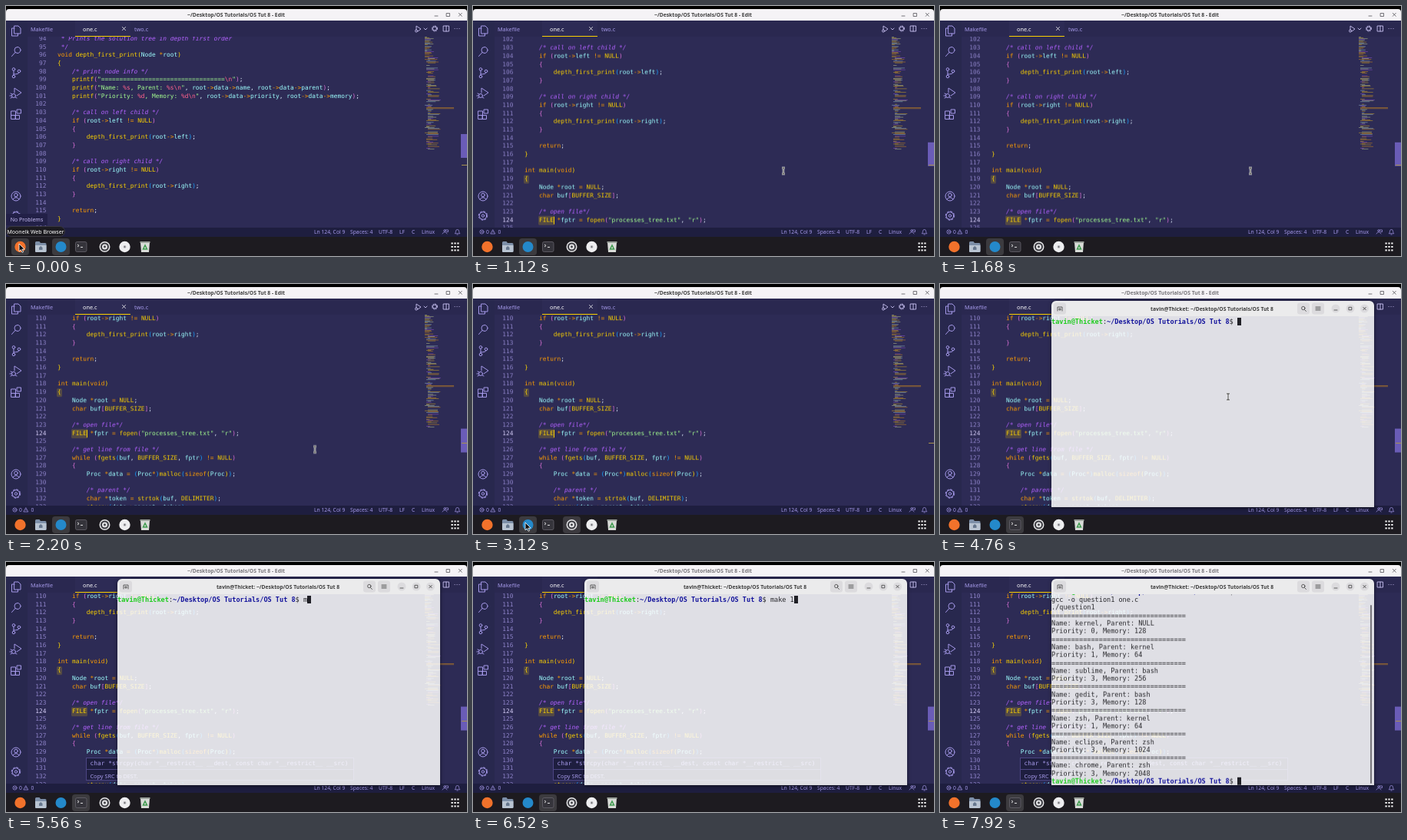
Write an HTML page that moves like this. It is 600x326 px and loops after 8000 ms.

```html
<!DOCTYPE html>
<html lang="en">
<head>
<meta charset="utf-8">
<title>Editor and terminal</title>
<style>
:root { --mono: "DejaVu Sans Mono", monospace; --sans: "Noto Sans", sans-serif; --row: 10.6875px; }
html, body { margin: 0; width: 100%; height: 100%; overflow: hidden; background: #000; }
#stage { position: relative; width: 600px; height: 326px; overflow: hidden; background: #2d2b55; }
#stage > * { position: absolute; }
.loop { animation: 8s linear infinite; }
.step { animation-timing-function: step-end; }

#editor { left: 28px; top: 40px; width: 515px; height: 249px; overflow: hidden; }
#listing { position: absolute; left: 0; top: 0; --notch: -28.125px; animation-name: scroll; }
#thumb { left: 592px; top: 167px; width: 8px; height: 31px; background: #7565c8; opacity: .85;
  --notch: 3.6px; animation-name: scroll, thumb; }
#listing div { position: absolute; white-space: pre; font: 7.875px/var(--row) var(--mono); color: #e1efff; }
#listing .no { left: 0; width: 24.5px; text-align: right; color: #8d82c8; }
#listing .mark { background: #fad00030; box-shadow: 0 0 0 .5px #fad00060; height: 9.6px; }
#listing .caret { width: 1px; height: 9.6px; background: #fad000; animation-name: caret; }
.comment { color: #b362ff; font-style: italic; }
.str { color: #a5ff90; }
.esc { color: #ff628c; }
.key, .op { color: #ff9d00; }
.fn, .macro { color: #fad000; }
.id { color: #9effff; }
.b0 { color: #ffd700; } .b1 { color: #da70d6; } .b2 { color: #179fff; }

#chrome { left: 0; top: 0; }
text { font: 6.75px var(--sans); fill: #a599e9; white-space: pre; }
.tab { font-size: 7.3px; }
.title { font-weight: bold; fill: #3d3d3d; text-anchor: middle; animation-name: blur; }
.line { fill: none; stroke: #a599e9; stroke-width: 1; stroke-linejoin: round; stroke-linecap: round; }
.lit { fill: #fff; fill-opacity: .14; }

.tip { box-sizing: border-box; font: 7px/13px var(--sans); color: #fff; white-space: pre; text-align: center; }
.dock { height: 14px; top: 287px; border-radius: 7px; background: #1c1b20; border: .5px solid #39373f; }
#hover { left: 104px; top: 255px; width: 349px; height: 30px; background: #1e1e3f; border: .5px solid #4d4684;
  color: #a599e9; box-sizing: border-box; overflow: hidden; animation-name: hover; }
#hover div { padding-left: 4.5px; white-space: pre; font: 7.875px/14px var(--mono); }
#hover div + div { font: 7.3px/16px var(--sans); border-top: .5px solid #4d4684; }

#term { left: 145px; top: 22px; width: 420px; height: 269px; border-radius: 6px 6px 0 0; overflow: hidden;
  box-shadow: 0 1px 5px #0008; animation-name: open; }
#bar { position: absolute; inset: 0 0 auto; height: 20px; background: #ebebec; }
#screen { position: absolute; inset: 20px 0 0; background: #ffffffd9; overflow: hidden; }
#rows { position: absolute; left: 0; top: 1.9px; font: 8.55px/10.3px var(--mono); color: #28282c;
  animation-name: feed; }
#rows div { height: 10.3px; white-space: pre; }
#rows b { color: #1fcc1f; } #rows b + b { color: #14149c; }
#rows i { display: inline-block; vertical-align: top; width: 1ch; height: 10.3px; background: #202026; }
#typed { display: inline-block; vertical-align: top; height: 10.3px; overflow: hidden; animation-name: type; }
#ask i { animation-name: before; }
#built { animation-name: built; }
#wait { animation-name: wait; }
#result { animation-name: after; }
#result i { animation-name: blink; }
#slide { position: absolute; right: 3px; top: 14px; width: 2px; height: 233px; border-radius: 1px;
  background: #77757c; animation-name: after; }

#mouse { left: 0; top: 0; animation-name: mouse; }
#arrow { animation-name: arrow; } #beam { animation-name: beam; }

@keyframes scroll {
  0% { transform: none; }
  11% { transform: translateY(var(--notch)); }
  12.5% { transform: translateY(calc(var(--notch) * 2)); }
  14% { transform: translateY(calc(var(--notch) * 3)); }
  23% { transform: translateY(calc(var(--notch) * 4)); }
  25% { transform: translateY(calc(var(--notch) * 5)); }
  26.5%, 100% { transform: translateY(calc(var(--notch) * 6)); }
}
@keyframes thumb { 0%, 36% { opacity: .85; } 38%, 56.5% { opacity: 0; } 57%, 100% { opacity: .85; } }
@keyframes caret {
  0% { opacity: 1; } 3.125% { opacity: 0; } 9.375% { opacity: 1; } 15.625% { opacity: 0; }
  21.875% { opacity: 1; } 28.125% { opacity: 0; } 34.375% { opacity: 1; } 40.625% { opacity: 0; }
  46.875% { opacity: 1; } 53.125%, 100% { opacity: 0; }
}
@keyframes blur { 0%, 57% { fill: #3d3d3d; } 58%, 100% { fill: #77757a; } }
@keyframes app { 0%, 2% { opacity: 1; } 4%, 100% { opacity: 0; } }
@keyframes problems { 0%, 5% { opacity: 1; } 6%, 100% { opacity: 0; } }
@keyframes terminal { 0%, 45% { opacity: 0; } 46.5%, 55% { opacity: 1; } 56.5%, 100% { opacity: 0; } }
@keyframes hover { 0% { opacity: 0; } 68.5%, 100% { opacity: 1; } }
@keyframes litApp { 0%, 2% { opacity: 1; } 3%, 100% { opacity: 0; } }
@keyframes litEditor { 0%, 57% { opacity: 1; } 58%, 100% { opacity: 0; } }
@keyframes litTerm { 0%, 42% { opacity: 0; } 43%, 100% { opacity: 1; } }
@keyframes litGear { 0%, 34% { opacity: 0; } 35.5%, 39% { opacity: 1; } 40.5%, 100% { opacity: 0; } }
@keyframes open {
  0%, 56.5% { opacity: 0; transform: scale(.9); }
  59%, 100% { opacity: 1; transform: none; }
}
@keyframes type {
  0% { width: 0; } 68.5% { width: 1ch; } 70% { width: 2ch; } 71.5% { width: 3ch; }
  73% { width: 4ch; } 76% { width: 5ch; } 78%, 100% { width: 6ch; }
}
@keyframes before { 0% { opacity: 1; } 85%, 100% { opacity: 0; } }
@keyframes built { 0% { opacity: 0; } 85%, 100% { opacity: 1; } }
@keyframes wait { 0% { opacity: 0; } 85% { opacity: 1; } 88%, 100% { opacity: 0; } }
@keyframes after { 0% { opacity: 0; } 88%, 100% { opacity: 1; } }
@keyframes feed { 0% { transform: none; } 88%, 100% { transform: translateY(-10.3px); } }
@keyframes blink { 0% { opacity: 1; } 91.5% { opacity: 0; } 99%, 100% { opacity: 1; } }
@keyframes mouse {
  0% { transform: translate(17px, 310px); animation-timing-function: ease-in-out; }
  8.5%, 27% { transform: translate(404px, 215px); animation-timing-function: ease-in-out; }
  35.5%, 36.5% { transform: translate(126px, 311px); animation-timing-function: ease-in-out; }
  39%, 40% { transform: translate(68px, 311px); animation-timing-function: ease-in-out; }
  43%, 50% { transform: translate(96px, 311px); animation-timing-function: ease-in-out; }
  54.5%, 55.5% { transform: translate(347px, 157px); }
  59%, 61.5% { transform: translate(375px, 147px); animation-timing-function: ease-in-out; }
  66.5%, 100% { transform: translate(120px, 290px); }
}
@keyframes arrow { 0% { opacity: 1; } 3% { opacity: 0; } 33% { opacity: 1; } 51.5%, 100% { opacity: 0; } }
@keyframes beam { 0% { opacity: 0; } 3% { opacity: 1; } 33% { opacity: 0; } 51.5% { opacity: 1; } 68.5%, 100% { opacity: 0; } }
</style>
</head>
<body>
<div id="stage">
  <div id="editor"><div id="listing" class="loop step"></div></div>
  <div id="thumb" class="loop step"></div>
  <svg id="chrome" width="600" height="326">
    <path d="M0 0h600v19H0z" fill="#000"/>
    <path d="M0 19V8q0-4 4-4h592q4 0 4 4v11z" fill="#f5f3f6"/>
    <text class="title loop" x="299.5" y="13.6">~/Desktop/OS Tutorials/OS Tut 8 - Edit</text>
    <g class="line" style="stroke:#55535a;stroke-width:.8">
      <path d="M558 13h4M573.5 9.5h4v4h-4zM589.3 9.3l4 4m0-4l-4 4"/>
    </g>
    <path d="M0 19h28v270H0z" fill="#28284e"/>
    <path d="M28 19h572v21H28z" fill="#2a2850"/>
    <path d="M90 19h72v21H90z" fill="#2d2b55"/>
    <path d="M90 39.5h72" stroke="#fad000"/>
    <text class="tab" x="32" y="32.6">Makefile</text>
    <text class="tab" x="100" y="32.6" style="fill:#fff">one.c</text>
    <text class="tab" x="167" y="32.6">two.c</text>
    <path class="line" d="M151.5 27.5l4 4m0-4l-4 4" style="stroke:#fff;stroke-width:.8"/>
    <g class="line">
      <path d="M11 26h5l3 3v7h-8zM11 29H7.5v10h8v-3"/>
      <circle cx="15" cy="57.5" r="4"/><path d="M12 60.5l-4.5 5"/>
      <circle cx="10" cy="82.5" r="1.8"/><circle cx="17" cy="85" r="1.8"/><circle cx="10" cy="92" r="1.8"/>
      <path d="M10 84.5v5.5M17 87q0 2-7 2"/>
      <path d="M11 113v-6l9 6-6 4"/><circle cx="10" cy="117" r="2.5"/><path d="M6 114l2 1m-3 2h2m-1 3l2-1m4 0l2 1"/>
      <path d="M7 137h5.5v5.5H7zM7 142.5h5.5v5H7zM12.5 142.5h5v5h-5zM14.5 135h5v5h-5z"/>
      <circle cx="13" cy="248" r="6"/><circle cx="13" cy="246.5" r="2.3"/><path d="M9 252q4-5 8 0"/>
      <circle cx="13" cy="273.5" r="4.8"/><circle cx="13" cy="273.5" r="1.7"/>
      <circle cx="13" cy="273.5" r="5.7" stroke-dasharray="2 2.48"/>
    </g>
    <g class="line" style="stroke:#c9c1f2;stroke-width:.9">
      <path d="M534 31v-5l6 4-4 3M544 29l2 2 2-2"/><circle cx="534" cy="32.5" r="1.5"/>
      <circle cx="558" cy="29.5" r="2.5"/><circle cx="558" cy="29.5" r="3.5" stroke-dasharray="1.2 1.55"/>
      <path d="M569.5 26h7v7h-7zM573 26v7M584 29.5h.1m2.9 0h.1m2.9 0h.1"/>
    </g>
    <g id="minimap"></g>
    <path d="M593 207.5h7" stroke="#a8924a"/>
    <path d="M0 289h600v12H0z" fill="#1e1e3f"/>
    <g class="line" style="stroke-width:.7">
      <circle cx="11.5" cy="294.5" r="2.6"/><path d="M10.5 293.5l2 2m0-2l-2 2M26 292l2.8 5h-5.6zM26 294v1"/>
      <path d="M568 297q3-5 6 0M572.5 292h3v2.5h-2M584.5 296.5q1-1 1-3a2 2 0 0 1 4 0q0 2 1 3zM587 298h1"/>
      <circle cx="571" cy="293" r="1.3"/>
    </g>
    <g id="status"></g>
    <path d="M0 301h600v25H0z" fill="#1d1b20"/>
    <rect class="lit loop" style="animation-name:litApp" x="7" y="303" width="23" height="22" rx="4"/>
    <rect class="lit loop" style="animation-name:litEditor" x="60" y="303" width="23" height="22" rx="4"/>
    <rect class="lit loop" style="animation-name:litTerm" x="86" y="303" width="23" height="22" rx="4"/>
    <rect class="lit loop" style="animation-name:litGear" x="117" y="303" width="23" height="22" rx="4"/>
    <circle cx="18.5" cy="314" r="7.2" fill="#f1722b"/>
    <path d="M38 308.5q0-1.500 1.500-1.500h4l1.500 2h6q1.500 0 1.500 1.500v9q0 1.500-1.500 1.500h-11.500q-1.500 0-1.500-1.500z" fill="#7d8fa8"/>
    <path d="M38 312h14.5v7.5q0 1.5-1.5 1.5h-11.5q-1.5 0-1.5-1.5z" fill="#b9c4d2"/>
    <path d="M43 318v-3l2.2-2 2.3 2v3z" fill="#66778e"/>
    <circle cx="71.5" cy="314" r="7" fill="#2489ca"/>
    <rect x="90.5" y="307.5" width="14.5" height="13" rx="2" fill="#35343b" stroke="#66646d" stroke-width=".8"/>
    <path d="M93 311l2 1.5-2 1.5m4 .5h3" fill="none" stroke="#eee" stroke-width=".9"/>
    <circle cx="128.5" cy="314" r="7" fill="#e4e4e6"/><circle cx="128.5" cy="314" r="4.5" fill="none" stroke="#3b3b41" stroke-width="2"/>
    <circle cx="128.5" cy="314" r="1.4" fill="#3b3b41"/>
    <circle cx="154.5" cy="314" r="7.2" fill="#eeeef0"/><circle cx="154.5" cy="314" r="2" fill="#bcbcc2"/><circle cx="154.5" cy="314" r=".8" fill="#444"/>
    <path d="M175 308h12l-1 13h-10z" fill="#d9dcd8"/><path d="M174.5 307h13v2h-13z" fill="#9aa09a"/>
    <path d="M178.5 317l2.5-5 2.5 5z" fill="none" stroke="#3e9a4e" stroke-width="1.5"/>
    <path d="M579.5 309.5h10M579.5 314h10M579.5 318.5h10" stroke="#fff" stroke-width="2.2" stroke-dasharray="2.2 1.7"/>
  </svg>
  <div id="hover" class="loop step"><div>char *strcpy(char *__restrict__ __dest, const char *__restrict__ __src)</div><div>Copy SRC to DEST.</div></div>
  <div class="tip loop" style="left:0;top:271px;width:54px;height:15px;line-height:15px;background:#222047;color:#c7bdf5;animation-name:problems">No Problems</div>
  <div class="tip dock loop" style="left:0;width:77px;animation-name:app">Moonelk Web Browser</div>
  <div class="tip dock loop" style="left:78px;width:39px;animation-name:terminal">Terminal</div>
  <div id="term" class="loop">
    <div id="screen">
      <div id="rows" class="loop step"></div>
      <div id="slide" class="loop step"></div>
    </div>
    <svg id="bar" width="420" height="20">
      <g fill="#dcdbde">
        <rect x="3" y="2.5" width="16" height="15" rx="3"/><rect x="320" y="2.5" width="16" height="15" rx="3"/><rect x="339" y="2.5" width="16" height="15" rx="3"/>
        <circle cx="370" cy="10" r="5.5"/><circle cx="389" cy="10" r="5.5"/><circle cx="407.5" cy="10" r="5.5"/>
      </g>
      <g class="line" style="stroke:#3d3d3d;stroke-width:.8">
        <path d="M8 13V8h6v5M11 9.5v3m-1.5-1.5h3M329.5 11.5l2 2M344 8h6m-6 2h6m-6 2h6M368 12h4M387.3 8.3h3.5v3.5h-3.5zM405.8 8.3l3.5 3.5m0-3.5l-3.5 3.5"/>
        <circle cx="327.8" cy="9.5" r="2.2"/>
      </g>
      <text style="font-weight:bold;fill:#3d3d3d;text-anchor:middle" x="209" y="12.5">tavin@Thicket: ~/Desktop/OS Tutorials/OS Tut 8</text>
    </svg>
  </div>
  <svg id="mouse" class="loop" width="20" height="20" overflow="visible">
    <path id="arrow" class="loop step" d="M0 0v10l2.4-2.2 1.6 3.6 1.6-.7-1.6-3.5h3.2z" fill="#111" stroke="#fff" stroke-width=".8"/>
    <g id="beam" class="loop step" fill="none">
      <path d="M-2-4h4M0-4v8M-2 4h4" stroke="#fff" stroke-width="2.4"/>
      <path d="M-2-4h4M0-4v8M-2 4h4" stroke="#333" stroke-width="1"/>
    </g>
  </svg>
</div>
<script>
const $ = id => document.getElementById(id);
const FIRST = 94, ROW = 10.6875, CHAR = 4.74, RULE = "=".repeat(34);

const program = String.raw` * Prints the solution tree in depth first order
 */
void depth_first_print(Node *root)
{
    /* print node info */
    printf("${RULE}\n");
    printf("Name: %s, Parent: %s\n", root->data->name, root->data->parent);
    printf("Priority: %d, Memory: %d\n", root->data->priority, root->data->memory);

    /* call on left child */
    if (root->left != NULL)
    {
        depth_first_print(root->left);
    }

    /* call on right child */
    if (root->right != NULL)
    {
        depth_first_print(root->right);
    }

    return;
}

int main(void)
{
    Node *root = NULL;
    char buf[BUFFER_SIZE];

    /* open file*/
    FILE *fptr = fopen("processes_tree.txt", "r");

    /* get line from file */
    while (fgets(buf, BUFFER_SIZE, fptr) != NULL)
    {
        Proc *data = (Proc*)malloc(sizeof(Proc));

        /* parent */
        char *token = strtok(buf, DELIMITER);
        strcpy(data->parent, token);`;

const toHtml = s => s.replace(/&/g, "&amp;").replace(/</g, "&lt;").replace(/>/g, "&gt;");
const span = (cls, s) => `<span class="${cls}">${s}</span>`;
let depth = 0;

function paint(token) {
  const s = toHtml(token);
  if (/^(\/\*| \*)/.test(token)) return span("comment", s);
  if (token[0] === '"') return span("str", s.replace(/\\n|%[sd]/g, m => span("esc", m)));
  if (/^[({[]$/.test(token)) return span("b" + depth++ % 3, s);
  if (/^[)}\]]$/.test(token)) return span("b" + --depth % 3, s);
  if (/^(void|int|char|if|while|return|sizeof)$/.test(token)) return span("key", s);
  if (/^[A-Z_]+$/.test(token)) return span("macro", s);
  if (/^\w/.test(token)) return span("id", s);
  return /^[-=!*>]/.test(token) ? span("op", s) : s;
}

function highlight(line) {
  const tokens = /\/\*.*?\*\/|^ \*.*|"[^"]*"|\w+|->|!=|[^\w]/g;
  return line.replace(tokens, (token, at) => {
    const call = /^\w/.test(token) && line[at + token.length] === "(" && token !== "sizeof";
    return call ? span("fn", token) : paint(token);
  });
}

const lineTop = n => 64.7 - 40 + (n - 96) * ROW - ROW / 2;
const box = (cls, n, col, width) =>
  `<div class="${cls}" style="left:${39 + col * CHAR}px;top:${lineTop(n) + .5}px;width:${width}px"></div>`;

$("listing").innerHTML = box("mark", 119, 0, CHAR) + box("mark", 124, 4, CHAR * 4) +
  program.split("\n").map((line, i) => {
    const n = FIRST + i, top = `top:${lineTop(n)}px`;
    const bright = n === 124 ? ";color:#d5cdf8" : "";
    return `<div class="no" style="${top}${bright}">${n}</div><div style="left:39px;${top}">${highlight(line)}</div>`;
  }).join("") + box("caret loop step", 124, 8, 1);

const statusItems = [["0", 17], ["0", 32.5], ["Ln 124, Col 9", 401], ["Spaces: 4", 448],
  ["UTF-8", 485], ["LF", 512], ["C", 528], ["Linux", 541]];
$("status").innerHTML = statusItems.map(([s, x]) => `<text x="${x}" y="297">${s}</text>`).join("");

// Small overview, one bar per line
let seed = 11;
const random = () => (seed = seed * 16807 % 2147483647) / 2147483647;
const tints = ["#c9a227", "#b9c58a", "#8fb3c9", "#d08a1e"];
let bars = "";
for (let i = 0; i < 132; i++) {
  const head = i < 24, gap = i % 11 === 10 || (!head && random() < .2);
  const indent = head ? 0 : [0, 2, 2, 4, 4][Math.floor(random() * 5)];
  const width = i === 82 || i === 83 ? 36 : 3 + random() * (head ? 10 : 14);
  const tint = i % 7 === 3 ? "#8a50cc" : tints[Math.floor(random() * 4)];
  if (!gap) bars += `<rect x="${545 + indent}" y="${40 + i * 1.125}" width="${width}" height=".8" fill="${tint}" opacity=".65"/>`;
}
$("minimap").innerHTML = bars;

const prompt = "<b>tavin@Thicket</b>:<b>~/Desktop/OS Tutorials/OS Tut 8</b>$ ";
const processes = [
  ["kernel", "NULL", 0, 128], ["bash", "kernel", 1, 64], ["sublime", "bash", 3, 256], ["gedit", "bash", 3, 128],
  ["zsh", "kernel", 1, 64], ["eclipse", "zsh", 3, 1024], ["chrome", "zsh", 3, 2048],
];
const row = s => `<div>${s}</div>`;
const report = processes.map(([name, parent, priority, memory]) =>
  row(RULE) + row(`Name: ${name}, Parent: ${parent}`) + row(`Priority: ${priority}, Memory: ${memory}`)).join("");
const cursor = '<i class="loop step"></i>';
$("rows").innerHTML =
  `<div id="ask">${prompt}<span id="typed" class="loop step">make 1</span>${cursor}</div>` +
  '<div id="built" class="loop step">gcc -o question1 one.c</div>' +
  '<div id="wait" class="loop step" style="position:absolute"><i></i></div>' +
  `<section id="result" class="loop step">${row("./question1")}${report}${row(prompt + cursor)}</section>`;
</script>
</body>
</html>
```
